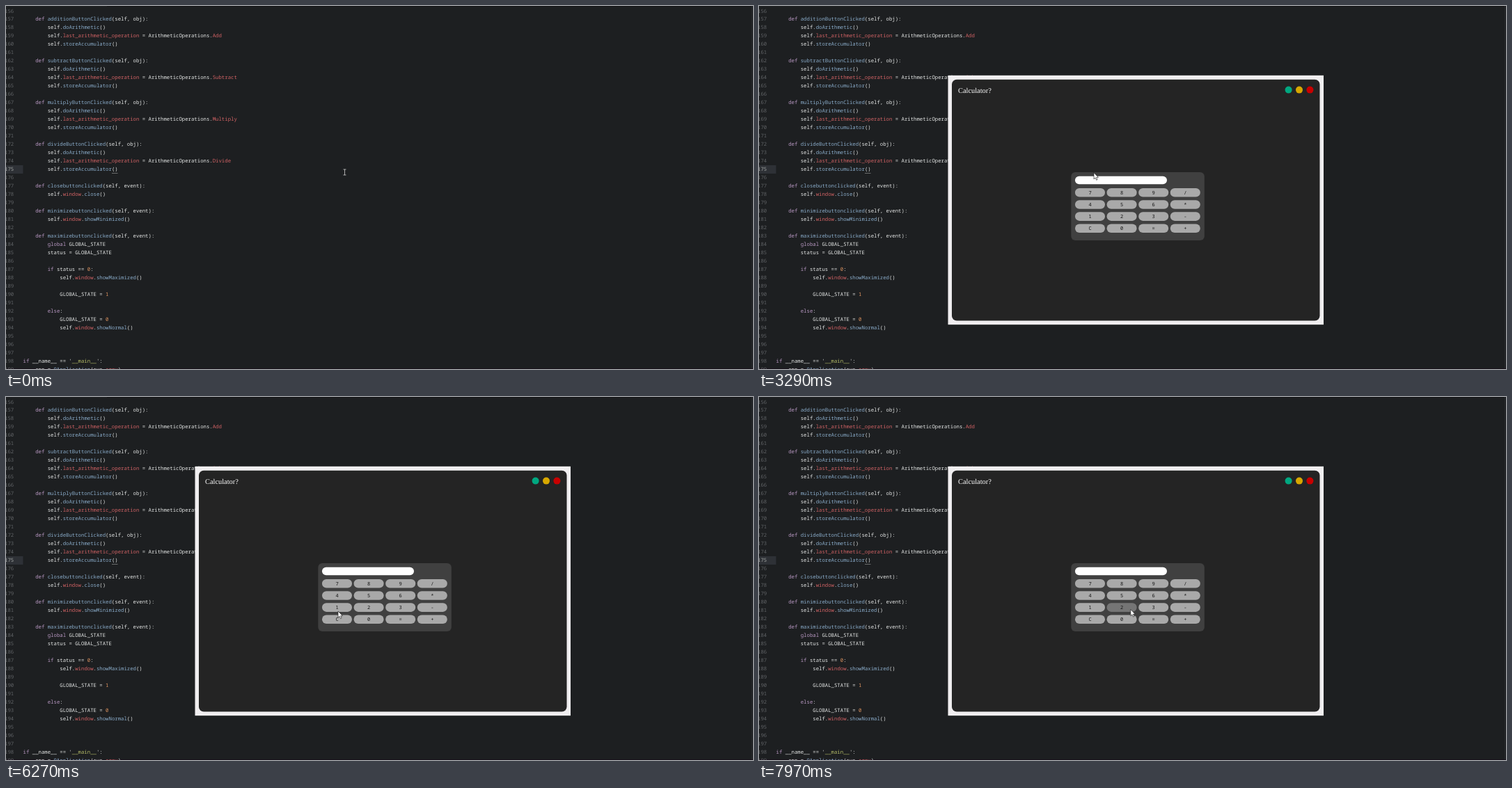
These frames come from a looping animation (1073x522 px, 8 s). An HTML page:

```html
<!DOCTYPE html>
<html lang="en">
<head>
<meta charset="utf-8">
<title>Calculator</title>
<style>
  html, body { margin: 0; width: 100%; height: 100%; overflow: hidden; background: #1d1f21; }
  svg { display: block; }
  text { text-rendering: geometricPrecision; }
  #code, #calc { font: 500 7.32px "Noto Sans Mono", "DejaVu Sans Mono", monospace; fill: #e4e6e5; }
  #calc text { font-size: 7px; fill: #161616; }
  #calc .title { font: 10.4px "Liberation Serif", Times, serif; fill: #fff; }
  .num { fill: #606366; }
  .num.now { fill: #a5a8a6; }
  .key { fill: #b898c2; }
  .fn { fill: #8aacca; }
  .attr { fill: #d06264; }
  .lit { fill: #de935f; }
  .str { fill: #b5bd68; }
</style>
</head>
<body>
<svg width="1073" height="522" viewBox="0 0 1073 522">
  <rect width="1073" height="522" fill="#1d1f21"/>
  <rect y="229" width="24.5" height="12" fill="#2e3136"/>
  <path d="M145 .5H1073" stroke="#111214"/>
  <path d="M1071.5 0V522" stroke="#25272a"/>
  <path d="M0 521.5H1073" stroke="#17101a"/>
  <g id="code"></g>
  <path d="M152 240.5h8.5" stroke="#8d908f" stroke-width=".7"/>
  <rect id="caret" x="161" y="229" width="1" height="12" fill="#c5c8c6"/>
  <g id="calc">
    <rect x="271.5" y="99.8" width="539.5" height="358.4" fill="#f0eef0"/>
    <rect x="277" y="105.8" width="528.5" height="346.7" rx="7" fill="#242424"/>
    <text class="title" x="286" y="124.5">Calculator?</text>
    <circle cx="760.6" cy="120.6" r="5" fill="#00a880"/>
    <circle cx="776" cy="120.6" r="5" fill="#d8a800"/>
    <circle cx="791.4" cy="120.6" r="5" fill="#c80000"/>
    <rect x="448.3" y="239" width="191.5" height="98" rx="6" fill="#404040"/>
    <rect x="454" y="244.8" width="132" height="11.4" rx="5.7" fill="#fff"/>
    <text id="display" x="455" y="253.3">1</text>
    <g id="keys" text-anchor="middle"></g>
  </g>
  <path id="beam" d="M-2-4H2M0-4V4M-2 4H2" fill="none" stroke="#d0d0d0" stroke-width=".8"/>
  <path id="arrow" d="M0 0V9.2L2.1 7.3 3.6 10.6 5.1 9.9 3.7 6.7H6.5Z" fill="#fff" stroke="#111" stroke-width=".6"/>
</svg>
<script>
const $ = id => document.getElementById(id);

const operation = (button, name) => `
    def ${button}ButtonClicked(self, obj):
        self.doArithmetic()
        self.last_arithmetic_operation = ArithmeticOperations.${name}
        self.storeAccumulator()
`;

const source = operation('addition', 'Add') + operation('subtract', 'Subtract') +
  operation('multiply', 'Multiply') + operation('divide', 'Divide') + `
    def closebuttonclicked(self, event):
        self.window.close()

    def minimizebuttonclicked(self, event):
        self.window.showMinimized()

    def maximizebuttonclicked(self, event):
        global GLOBAL_STATE
        status = GLOBAL_STATE

        if status == 0:
            self.window.showMaximized()

            GLOBAL_STATE = 1

        else:
            GLOBAL_STATE = 0
            self.window.showNormal()



if __name__ == '__main__':
    app = QApplication(sys.argv)`;

const syntax = /\b(?<key>def|global|if|else)\b|(?<fn>\w+)(?=\()|(?<=\.)(?<attr>\w+)|(?<lit>\b\d+\b)|(?<str>__main__)/g;

function highlight(line) {
  return line.replace(syntax, (word, ...rest) => {
    const groups = rest.at(-1);
    const kind = Object.keys(groups).find(name => groups[name]);
    return `<tspan class="${kind}">${word}</tspan>`;
  });
}

$('code').innerHTML = source.split('\n').map((line, i) => {
  const number = 156 + i, y = 9.5 + i * 11.98;
  const body = line.trimStart();
  const x = 24.6 + (line.length - body.length) * 4.39;
  return `<text class="num${number === 175 ? ' now' : ''}" x="-2" y="${y}">${number}</text>` +
    `<text x="${x}" y="${y}">${highlight(body)}</text>`;
}).join('');

$('keys').innerHTML = [...'789/456*123-C0=+'].map((label, i) => {
  const x = 454 + i % 4 * 45.6, y = 262 + (i >> 2) * 17.15;
  return `<rect data-key="${label}" x="${x}" y="${y}" width="43" height="12.6" rx="6.2"/>` +
    `<text x="${x + 21.5}" y="${y + 9}">${label}</text>`;
}).join('');
const keys = [...document.querySelectorAll('[data-key]')];

const tick = 142.3;

// Each move glides from the previous resting place: first tick, last tick, x, y
const rest = [486.5, 239];
const moves = [
  [13, 16, 481, 239.7],
  [26, 32, 407, 211.5],
  [33, 36, 458, 131.5],
  [37, 40, 457, 280],
  [40, 44, 477, 308],
  [46, 48, 567, 295.5],
  [48, 51, 612, 318],
  [54, 56, 533.8, 305.5]
];

function pointer(t) {
  const now = Math.floor(t / tick);
  return moves.reduce(([px, py], [from, to, x, y]) => {
    const k = Math.min(1, Math.max(0, (now - from) / (to - from)));
    return [px + (x - px) * k, py + (y - py) * k];
  }, rest);
}

function pressedKey(t) {
  if (t >= 6390 && t < 6540) return '1';
  if (t >= 7420 && t < 7710) return '+';
  if (t >= 7970) return '2';
}

function show(node, on) {
  node.style.display = on ? '' : 'none';
}

function draw(t) {
  const place = `translate(${pointer(t)})`;
  for (const id of ['beam', 'arrow']) $(id).setAttribute('transform', place);
  show($('beam'), t < 3170);
  show($('arrow'), t >= 3170);
  show($('calc'), t >= 3290);
  show($('caret'), t < 3020 && Math.floor((t + 77) / 387) % 2);
  show($('display'), t >= 6540 && t < 7710);

  const pressed = pressedKey(t);
  for (const key of keys) key.setAttribute('fill', key.dataset.key === pressed ? '#757575' : '#a9a9a9');
}

const start = performance.now();
function frame() {
  draw((performance.now() - start) % 8000);
  requestAnimationFrame(frame);
}
frame();
</script>
</body>
</html>
```
